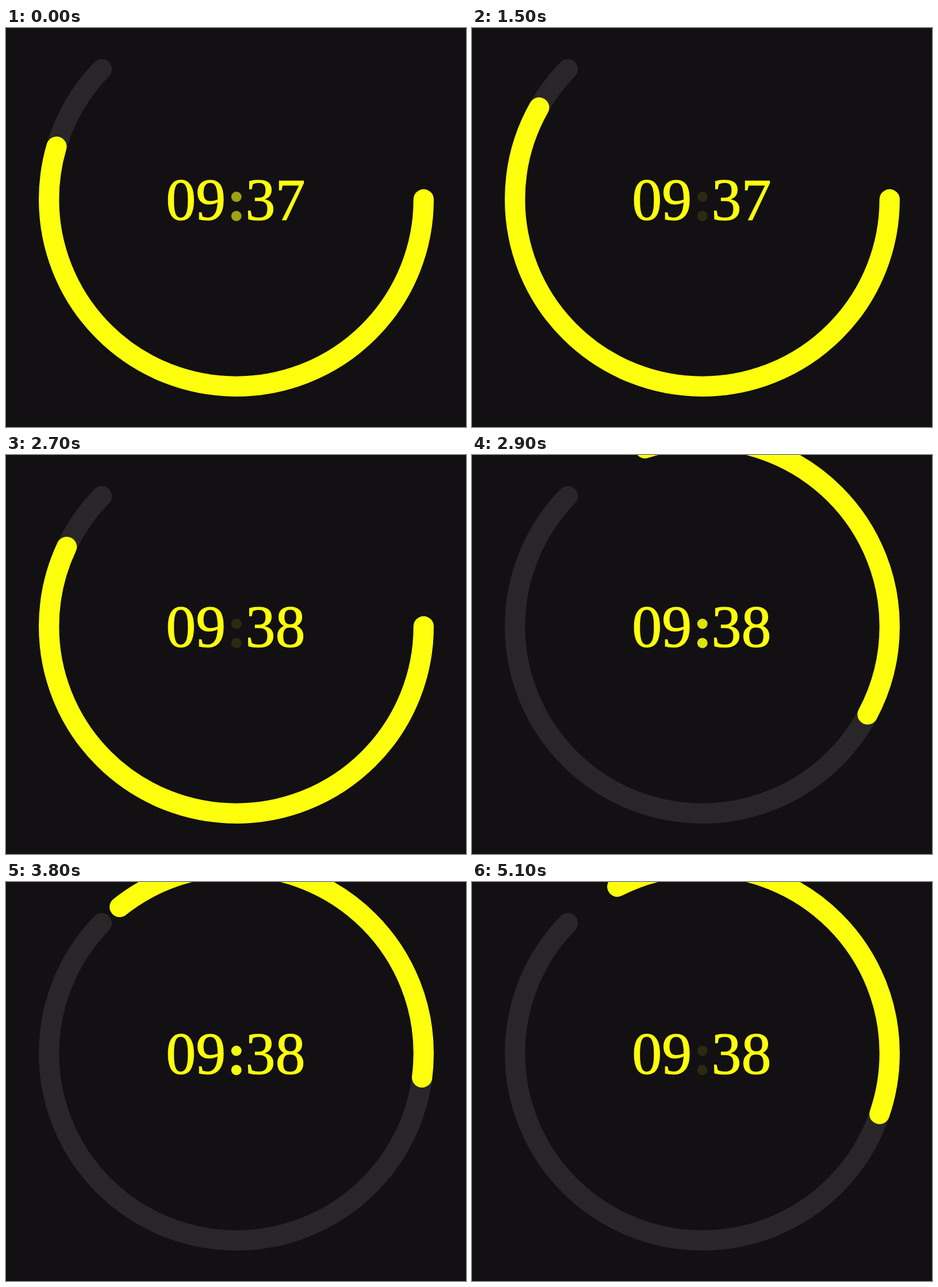
Write an HTML page that moves like this. It is 800 by 695 pixels and loops after 5200 ms.

```html
<!DOCTYPE html>
<html lang="en">
<head>
<meta charset="utf-8">
<title>Clock ring</title>
<style>
  html, body { margin: 0; height: 100%; overflow: hidden; background: #121012; }
  svg { display: block; }
  .ring circle { fill: none; stroke-width: 35.3; stroke-linecap: round; stroke-dasharray: 224.1; }
  .track { stroke: #282629; }
  .hand { stroke: #fdff0c; }
  .digits { fill: #fdff0c; font: 104px "Liberation Serif", "Times New Roman", serif; }
  .digits text { stroke: #fdff0c; stroke-width: 1.2; }
  #colon { fill: #f6ff0c; }
</style>
</head>
<body>
<svg width="800" height="695" viewBox="0 0 800 695">
  <g class="ring">
    <circle class="track" cx="400.5" cy="298.5" r="325.8" pathLength="360"/>
    <circle class="hand" id="hand" cx="400.5" cy="298.5" r="325.8" pathLength="360"/>
  </g>
  <g class="digits">
    <text x="278.3" y="334.2">09</text>
    <g id="colon">
      <circle cx="400.7" cy="294" r="9"/>
      <circle cx="400.7" cy="327.5" r="9"/>
    </g>
    <text id="minutes" x="416.6" y="334.2">37</text>
  </g>
</svg>
<script>
const LOOP = 5200, FRAME = 100, SECOND = 400; // ms; the clock runs 2.5 times too fast
const SPAN = 224.1;                           // degrees swept in one minute
const START = 52.332;                         // clock seconds at the start of the loop
const COLON_LEAD = 0.025;
const [hand, colon, minutes] = ["hand", "colon", "minutes"].map(id => document.getElementById(id));

// cubic-bezier(.25, .1, .25, 1), the CSS "ease" curve
function ease(x) {
  const bezier = (s, a, b) => 3 * (1 - s) ** 2 * s * a + 3 * (1 - s) * s * s * b + s ** 3;
  let low = 0, high = 1;
  for (let i = 0; i < 24; i++) {
    const mid = (low + high) / 2;
    if (bezier(mid, .25, .25) < x) low = mid; else high = mid;
  }
  return bezier(low, .1, 1);
}

function draw(time) {
  const t = Math.floor(time % LOOP / FRAME) * FRAME;
  const clock = START + t / SECOND;
  const tick = Math.floor(clock);
  const from = tick % 60, to = (tick + 1) % 60;
  const seconds = from + (to - from) * ease(clock - tick);

  hand.style.strokeDashoffset = SPAN * (1 - seconds / 60);
  colon.style.opacity = ease((clock + COLON_LEAD) % 1);
  minutes.textContent = tick < 59 ? "37" : "38";
}

const begin = performance.now();
function loop() {
  draw(performance.now() - begin);
  requestAnimationFrame(loop);
}
loop();
</script>
</body>
</html>
```
